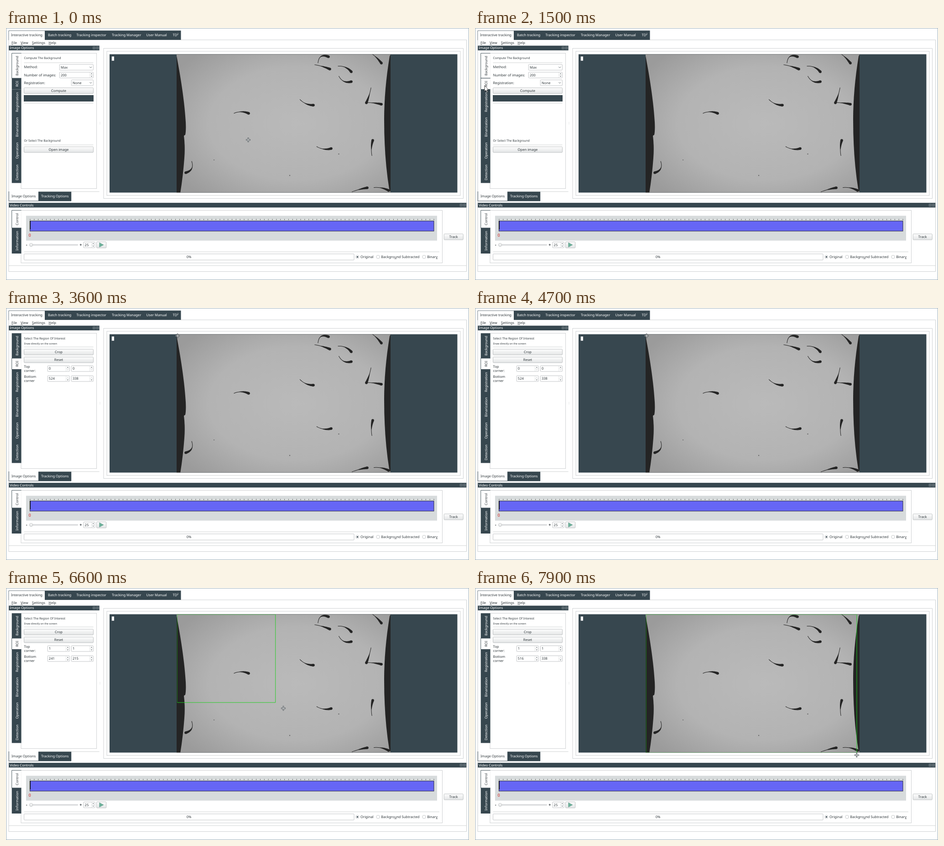
An HTML page that plays this animation: 1015 px wide and 552 px high, repeating every 8 s.

```html
<!DOCTYPE html>
<html lang="en">
<head>
<meta charset="utf-8">
<title>Interactive tracking</title>
<style>
html, body { margin: 0; width: 100%; height: 100%; overflow: hidden; background: #fff; }
svg { display: block; width: 100%; height: 100%; }
text { font-family: "Noto Sans", "Open Sans", sans-serif; font-size: 7.6px; fill: #30383c; text-rendering: geometricPrecision; white-space: pre; }
.u { text-decoration: underline; }
.bold { font-weight: 700; }
.dark { fill: #37474f; }
.light { fill: #fff; }
.red { fill: #d8201c; }
.box { fill: none; stroke: #c3c6c8; stroke-width: .8; }
.open { fill: #fff; stroke: #37474f; stroke-width: .9; }
.field { fill: #fff; stroke: #b4b8ba; stroke-width: .8; }
.btn { fill: url(#btn); stroke: #b2b5b7; stroke-width: .8; }
.rule { stroke: #c6c9ca; stroke-width: .8; }
.off { opacity: .3; }
.tab path { fill: #37474f; }
.tab text { fill: #fff; }
.tab.on path { fill: #fff; stroke: #37474f; stroke-width: .9; }
.tab.on text { fill: #30383c; }
</style>
</head>
<body>
<svg id="stage" viewBox="0 0 1015 552" preserveAspectRatio="none"></svg>
<script>
const INK = '#37474f';
const PIC = { x: 374.9, y: 58, w: 524, h: 338, zoom: .8955 };

const text = (x, y, s, size = 7.6, more = '') =>
  `<text x="${x}" y="${y + size * .355}" style="font-size:${size}px" ${more}>${s}</text>`;
const mid = (x, y, s) => text(x, y, s, 7.6, 'text-anchor="middle"');
const rect = (x, y, x2, y2, cls, more = '') =>
  `<rect x="${x}" y="${y}" width="${x2 - x}" height="${y2 - y}" class="${cls}" ${more}/>`;
const rule = (x, x2, y) => `<line class="rule" x1="${x}" x2="${x2}" y1="${y}" y2="${y}"/>`;
const under = (c) => `<tspan class="u">${c}</tspan>`;
const button = (x, y, x2, y2, s) =>
  rect(x, y, x2, y2, 'btn', 'rx="1.5"') + mid((x + x2) / 2, (y + y2) / 2, s);
const wideButton = (y, s) => button(39.5, y, 191.5, y + 12.6, s);
const arrow = (x, y, dir) => `<path d="M${x - 1.5} ${y + dir}h3l-1.5 ${-2 * dir}z" fill="#596266"/>`;

function spin(x, y, x2, value, id = 'spin') {
  const y2 = y + 12.5, c = y + 6.25, s = x2 - 3.8;
  return rect(x, y, x2, y2, 'field', 'rx="1"') +
    `<path d="M${x2 - 7.5} ${y}V${y2}M${x2 - 7.5} ${c}H${x2}" stroke="#d0d3d4" stroke-width=".6"/>` +
    text(x + 2.6, c, value, 7.6, `id="${id}"`) +
    `<g id="${id}Up">${arrow(s, c - 3, 1)}</g><g id="${id}Dn">${arrow(s, c + 3, -1)}</g>`;
}

function combo(x, y, value) {
  const c = y + 6.25;
  return rect(x, y, 191.3, y + 12.5, 'field', 'rx="1"') + text(x + 2.8, c, value) +
    `<path d="M183.3 ${c - 1.2}l2.4 2.4 2.4-2.4" fill="none" stroke="#596266" stroke-width=".9"/>`;
}

// Stacked vertical tabs; each entry is a label and its bottom edge.
function sideTabs(id, top, tabs) {
  return tabs.map(([s, end], i) => {
    const y = i ? tabs[i - 1][1] : top;
    return `<g class="tab" id="${id}${i}"><path d="M33.5 ${y}H12.7V${end}H33.5"/>` +
      `<text text-anchor="middle" transform="translate(26.6 ${(y + end) / 2}) rotate(-90)">${s}</text></g>`;
  }).join('');
}

function titleBar(x2, y, s) {
  const c = y + 5;
  const icon = (x) => `<path d="M${x - 2.5} ${c - 2.5}h5v5h-5zm1 1l3 3m0-3l-3 3" fill="none" stroke="#8e999e" stroke-width=".7"/>`;
  return rect(6.2, y, x2, y + 10.3, 'dark') + text(8.3, c, s, 7.6, 'class="light"') +
    icon(x2 - 11.5) + icon(x2 - 4.2);
}

// Head position, direction of the tail in degrees, sideways bend of the body.
const shoal = [
  [707, 63, 149, 18], [710, 90, 196, 2], [757, 96, 203, 8], [757, 117.5, 204, -12],
  [823, 77, 223, 3], [790, 164, 287, 2], [823, 167, 186, 2], [674, 169, 203, -7],
  [532, 187, 180, 7], [713, 264, 188, -7], [804, 246, 93, 4], [394, 317, 297, 15],
  [792, 350, 165, 2], [839, 356, 191, 5]
];

function fish([hx, hy, deg, bend]) {
  const a = deg * Math.PI / 180, ux = Math.cos(a), uy = Math.sin(a);
  const len = 36 - Math.abs(bend) / 2, n = 18, left = [], right = [];
  for (let i = 0; i <= n; i++) {
    const s = i / n, along = s * len, side = 2 * s * (1 - s) * bend;
    const slope = 2 * (1 - 2 * s) * bend / len, k = Math.hypot(1, slope);
    const w = .5 + 2.4 * Math.max(0, 1 - s / .62);
    const point = (dir) => {
      const p = along - dir * w * slope / k, q = side + dir * w / k;
      return `${(hx + ux * p - uy * q).toFixed(1)} ${(hy + uy * p + ux * q).toFixed(1)}`;
    };
    left.push(point(1));
    right.unshift(point(-1));
  }
  return `<path d="M${left.concat(right).join('L')}z"/><circle cx="${hx}" cy="${hy}" r="2.8"/>`;
}

const defs = `<defs>
  <linearGradient id="btn" x2="0" y2="1"><stop stop-color="#fdfdfd"/><stop offset="1" stop-color="#e3e5e6"/></linearGradient>
  <radialGradient id="tank" cx=".56" cy=".5" r=".68">
    <stop stop-color="#bababa"/><stop offset=".6" stop-color="#b3b3b3"/><stop offset="1" stop-color="#9b9b9b"/>
  </radialGradient>
  <filter id="soft"><feGaussianBlur stdDeviation=".6"/></filter>
  <clipPath id="view">${rect(374, 57.5, 843, 360.5, '')}</clipPath>
</defs>`;

function frame() {
  const tabs = [[92, 'Batch tracking'], [154.5, 'Tracking inspector'], [232, 'Tracking Manager'],
    [307.5, 'User Manual'], [365.5, 'TD²']];
  const menu = [[12, 'File'], [32, 'View'], [57, 'Settings'], [93.3, 'Help']];
  return rect(.5, .5, 1014.5, 551.5, '', 'fill="#fff" stroke="#9fb0bc"') +
    rect(6, 26, 1009.5, 533.5, 'box') +
    '<path class="open" d="M6 26.5V6H85"/>' + rect(6.5, 6.5, 85, 27, 'light') +
    rect(85, 5.6, 383.5, 26, 'dark') + text(11, 15.8, 'Interactive tracking') +
    tabs.map(([x, s]) => text(x, 15.8, s, 7.6, 'class="light"')).join('') +
    menu.map(([x, s]) => text(x, 32, under(s[0]) + s.slice(1))).join('');
}

function imageDock() {
  return titleBar(204.7, 38.7, 'Image Options') + rect(33, 55.3, 198.7, 351.7, 'box') +
    sideTabs('t', 55.3, [['Background', 110], ['ROI', 134.5], ['Registration', 190],
      ['Binarization', 244], ['Operation', 293], ['Detection', 339.5]]) +
    `<g id="bgPane">${text(39.5, 66, 'Compute The Background', 6.6)}${rule(39.5, 191.5, 76)}
    ${text(39.5, 85.8, 'Method:')}${combo(117.3, 79.8, 'Max')}
    ${text(39.5, 103, 'Number of images:', 7.75)}${spin(117.3, 96.8, 191.3, '200')}
    ${text(39.5, 119.8, 'Registration:', 7.75)}${combo(143.3, 113.7, 'None')}
    ${wideButton(130.9, 'Compute')}
    ${rect(39.5, 147.5, 191.5, 160.6, 'dark', 'stroke="#26343b" stroke-width=".8"')}${rule(39.5, 191.5, 164.6)}
    ${text(39.5, 246.6, 'Or Select The Background', 6.6)}${rule(39.5, 191.5, 256)}
    ${wideButton(260, 'Open image')}</g>` +
    `<g id="roiPane">${text(39.5, 66.3, 'Select The Region Of Interest', 6.65)}
    ${text(39.5, 77.8, 'Draw directly on the screen', 5.67)}${rule(39.5, 191.5, 85.3)}
    ${wideButton(90.2, 'Crop')}${wideButton(107.3, 'Reset')}
    ${text(39.5, 128, 'Top')}${text(39.5, 137, 'corner:')}
    ${spin(91.2, 126.5, 139.2, '0', 'x1')}${spin(143.3, 126.5, 191.3, '0', 'y1')}
    ${text(39.5, 150, 'Bottom')}${text(39.5, 159, 'corner')}
    ${spin(91.2, 148.4, 139.2, '524', 'x2')}${spin(143.3, 148.4, 191.3, '338', 'y2')}</g>` +
    rule(71, 204.7, 358.4) + '<path class="open" d="M6.3 358V379H71"/>' +
    text(12, 368.7, 'Image Options') +
    rect(71, 358.6, 143.2, 379.3, 'dark') + text(77, 368.7, 'Tracking Options', 7.6, 'class="light"') +
    '<path class="rule" d="M206 206v6" stroke-dasharray="1 1"/>';
}

function viewer() {
  return rect(214, 44.7, 1002.5, 373.3, 'box') + rect(221, 51, 996, 366.8, 'box') +
    rect(227, 57.5, 989.5, 360.5, 'dark') +
    `<g clip-path="url(#view)">${rect(374, 57.5, 843, 360.5, '', 'fill="url(#tank)"')}
    <g filter="url(#soft)" fill="#242424">
      <path d="M373 56C378 82 391 150 394 206Q395 225 393 234L390 236Q393 260 391 285Q388 325 382 362H373z"/>
      <path d="M844 56L841 62Q829 135 829 200Q829 285 840 352L844 362z"/>
      <path d="M374 57.7H843M374 360.4H843" stroke="#5c5c5c" stroke-width=".8"/>
      ${shoal.map(fish).join('')}
      <g fill="#6a6a6a"><circle cx="456" cy="289" r="1.1"/><circle cx="729.5" cy="276" r="1.2"/><circle cx="622" cy="323" r="1.2"/></g>
    </g></g>` + rect(231.8, 62.4, 237, 71.6, 'light');
}

function videoDock() {
  let ticks = '';
  for (let i = 0; i <= 100; i++) ticks += `M${(53 + i * 8.85).toFixed(2)} 418.4v2.2`;
  const radio = (x, s, on) => `<circle cx="${x}" cy="501.4" r="3.6" class="field"/>` +
    (on ? `<circle cx="${x}" cy="501.4" r="1.7" fill="${INK}"/>` : '') + text(x + 6.7, 501.4, s);
  return titleBar(1009.3, 382.9, 'Video Controls') + rect(33, 399.4, 956.5, 514.7, 'box') +
    sideTabs('v', 399.4, [['Control', 438], ['Information', 494]]) +
    rect(44, 411.3, 945, 465.7, '', 'fill="#d7dbdc"') +
    `<path d="${ticks}" stroke="#3a3a3a" stroke-width=".9"/>` +
    rect(52.5, 422.8, 938, 444.9, '', 'fill="#6666f5" stroke="#1c1c2c" stroke-width=".9"') +
    rect(52, 422.4, 53.8, 441, '', 'fill="#111"') + text(49.6, 453.8, '0', 9, 'class="red"') +
    text(43.8, 475.2, '-', 9, 'class="bold"') + text(161.2, 475, '+', 9, 'class="bold"') +
    rect(55, 474.2, 157.5, 476, 'field', 'rx=".9"') + '<circle cx="55" cy="475.1" r="3.5" class="btn"/>' +
    spin(170, 468.8, 195, '25') + rect(198.5, 468.4, 219.8, 481.8, 'btn', 'rx="1.5"') +
    '<path d="M204.8 470.3v9.6l9-4.8z" fill="#6db39b" stroke="#5a8d7e" stroke-width=".6"/>' +
    rule(39.5, 950, 490.3) + rect(39.5, 494.8, 763, 508.2, 'field', 'rx="1"') + mid(401, 501.4, '0%') +
    radio(770.4, 'Original', true) + radio(815.6, `Backgro${under('u')}nd Subtracted`) +
    radio(916.5, `Binar${under('y')}`) +
    button(960.2, 451, 1002.3, 464, 'Track') + rule(6, 1009, 520.6);
}

const overlay = `
  <g clip-path="url(#view)" fill="none" stroke="#1fd01f" stroke-width=".95">
    <path id="near" opacity=".55"/><path id="far"/></g>
  <g id="cross"><path d="M-5 0H5M0-5V5" stroke="#2a3338" stroke-width="2.6"/><path d="M-4.5 0H4.5M0-4.5V4.5" stroke="#fff"/></g>
  <path id="pointer" d="M0 0V13L3 10.3 5 14.6 7 13.7 5.1 9.5H9z" fill="#fff" stroke="#222" stroke-width=".9"/>`;

const $ = (id) => document.getElementById(id);
$('stage').innerHTML = defs + frame() + imageDock() + viewer() + videoDock() + overlay;
$('v0').classList.add('on');

// Mouse strokes: start, end, where to, ease-out power. It rests in between.
const strokes = [
  [100, 1000, 34, 170, 1.6], [1000, 1300, 21, 137], [1300, 1500, 21, 126],
  [2100, 2500, 240, 113.5], [3500, 3600, 376, 61], [5200, 5500, 375.5, 59],
  [5800, 6100, 409.3, 101.5], [6100, 6400, 539, 211], [6500, 6700, 677, 316],
  [6800, 7100, 828.3, 349, 1.6], [7100, 7300, 847, 360], [7300, 7700, 837.3, 364],
  [7800, 7900, 836.8, 366]
];

function mouseAt(t) {
  let x = 531, y = 245;
  for (const [from, to, tx, ty, ease = 1] of strokes) {
    if (t <= from) break;
    const p = 1 - Math.pow(1 - Math.min(1, (t - from) / (to - from)), ease);
    x += (tx - x) * p;
    y += (ty - y) * p;
  }
  return [x, y];
}

const show = (id, on) => { $(id).style.display = on ? '' : 'none'; };

function setSpin(id, value, max) {
  $(id).textContent = value;
  $(id + 'Up').classList.toggle('off', value >= max);
  $(id + 'Dn').classList.toggle('off', value <= 0);
}

function setRegion(t) {
  const dragging = t >= 5900, corner = dragging ? 1 : 0;
  let w = PIC.w, h = PIC.h;
  if (dragging) {
    const [x, y] = mouseAt(t - 25); // the selection lags a little behind
    w = Math.min(w, Math.round((x - PIC.x) / PIC.zoom));
    h = Math.min(h, Math.round((y - PIC.y) / PIC.zoom));
  }
  setSpin('x1', corner, PIC.w);
  setSpin('y1', corner, PIC.h);
  setSpin('x2', w, PIC.w);
  setSpin('y2', h, PIC.h);

  const l = 375.3, top = 58.2, r = PIC.x + w * PIC.zoom, b = PIC.y + .3 + h * PIC.zoom;
  $('near').setAttribute('d', `M${l} ${b}V${top}H${r}`);
  $('far').setAttribute('d', `M${r} ${top}V${b}H${l}`);
  show('near', dragging);
  show('far', dragging);
}

function draw(t) {
  const [x, y] = mouseAt(t), inView = x > 227;
  show('cross', inView);
  show('pointer', !inView);
  $(inView ? 'cross' : 'pointer').setAttribute('transform', `translate(${x} ${y})`);

  const roiOpen = t >= 1700;
  const hover = x < 33 ? (y < 134.5 ? 1 : 2) : -1;
  for (let i = 0; i < 6; i++) $('t' + i).classList.toggle('on', i === +roiOpen || i === hover);
  show('bgPane', !roiOpen);
  show('roiPane', roiOpen);
  setRegion(t);
}

const start = performance.now();
function tick(now) {
  const t = Math.max(0, now - start) % 8000;
  draw(Math.floor(t / 100 + .01) * 100);
  requestAnimationFrame(tick);
}
draw(0);
requestAnimationFrame(tick);
</script>
</body>
</html>
```
